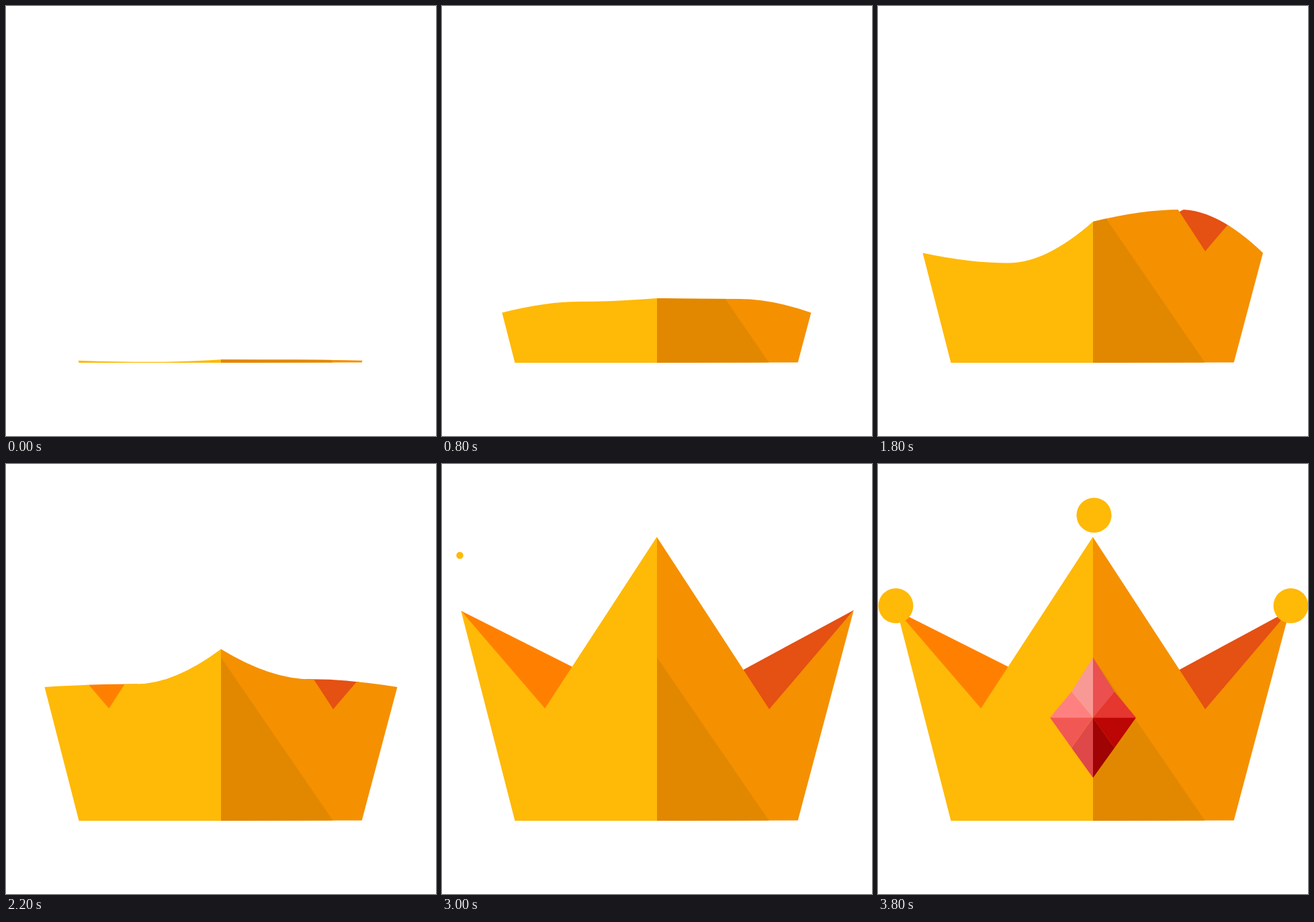
An HTML page for the animation above (4800 ms loop, 640 by 640 pixels).

```html
<!DOCTYPE html>
<html lang="en">
<head>
<meta charset="utf-8">
<title>Crown</title>
<style>
  html, body { margin: 0; width: 100%; height: 100%; overflow: hidden; background: #fff; }
  svg { display: block; width: 100%; height: 100%; }
</style>
</head>
<body>
<svg viewBox="0 0 640 640">
  <defs><clipPath id="fill"><path id="wave"/></clipPath></defs>
  <g clip-path="url(#fill)">
    <path fill="#ff8000" d="M28.3 218.5L193.3 301.5L200 372H153Z"/>
    <path fill="#e55013" d="M612.8 217.5L449 306L440 372H487Z"/>
    <path fill="#ffb907" d="M28.3 218.5L153.2 363.7L319.7 108.5L320 109V531H108.5Z"/>
    <path fill="#f59000" d="M320 109L487 365L612.8 217.5L529.7 530.5L320 531Z"/>
    <path fill="#e28800" d="M320 288L486.5 530.5L320 531Z"/>
  </g>
  <g id="gem"></g>
  <g id="dots" fill="#ffb907"></g>
</svg>
<script>
const STEP = 100, LAST = 38, LOOP = 4800;
const KEY_GAP = 6, SPEED_UP = 24, FULL = 30;
const GEM_END = 36, GEM_STEPS = 5;
const HANDLE = 0.45;

// Heights of the two swells, one every KEY_GAP steps
const leftSwell = [529.8, 480, 360, 382.5, 300, 300];
const rightSwell = [526.5, 440, 428, 303, 329, 306];

const dots = [
  { x: 26.5, y: 211, end: 34 },
  { x: 321.5, y: 76.2, end: 36 },
  { x: 614.5, y: 211, end: 38 }
];

const byId = id => document.getElementById(id);
const clamp = (v, lo, hi) => Math.min(hi, Math.max(lo, v));
const mix = (a, b, f) => a + (b - a) * f;
const leftEdge = y => 28.3 + (y - 218.5) * 0.2566;
const rightEdge = y => 612.8 - (y - 217.5) * 0.2655;

function add(parent, tag, attrs) {
  const el = document.createElementNS("http://www.w3.org/2000/svg", tag);
  for (const name in attrs) el.setAttribute(name, attrs[name]);
  byId(parent).append(el);
  return el;
}

// Inner and outer facet of each quarter: upper left, upper right, lower left, lower right
const facetColors = ["#f99995", "#ff8080", "#eb4f4f", "#e53630",
                     "#de4848", "#f25853", "#a00303", "#bc0505"];
let facet = 0;
for (const [tip, bend] of [[-89.5, -38.5], [89.5, 45]]) {
  for (const side of [-1, 1]) {
    for (const corner of [`0 ${tip}`, `${64 * side} 0`]) {
      add("gem", "path", { d: `M0 0L${corner}L${32 * side} ${bend}Z`, fill: facetColors[facet++] });
    }
  }
}
for (const dot of dots) dot.el = add("dots", "circle", { cx: dot.x });

const keyed = (track, n) => {
  const i = Math.floor(n / KEY_GAP);
  return mix(track[i], track[i + 1], n / KEY_GAP - i);
};
const rise = (from, rate, boost, n) => from - rate * n - boost * Math.max(0, n - SPEED_UP);

// A swell is level at its node; both handles lie at the node's height.
function swell(x0, x, y, x1, y1) {
  return `Q${mix(x, x0, HANDLE)} ${y} ${x} ${y}Q${mix(x, x1, HANDLE)} ${y} ${x1} ${y1}`;
}

function wavePath(n) {
  if (n >= FULL) return "M0 0H640V640H0Z";
  const edge = rise(527.7, 8.9, 10.4, n);
  const peak = rise(526.3, 11.4, 17.8, n);
  const x0 = leftEdge(edge), x1 = rightEdge(edge);
  return `M0 640V${edge}H${x0}` +
    swell(x0, 215 - 1.2 * Math.min(n, 18), keyed(leftSwell, n), 320, peak) +
    swell(320, 437 + 0.75 * n, keyed(rightSwell, n), x1, edge) +
    "H640V640Z";
}

function drawGem(n) {
  const left = clamp(GEM_END - n, 0, GEM_STEPS);
  byId("gem").setAttribute("opacity", 1 - left / GEM_STEPS);
  byId("gem").setAttribute("transform",
    `translate(320 ${377.6 - 2 * left}) scale(${1 + left / 6})`);
}

// Each dot grows while sinking slowly, then drops into place.
function drawDot({ el, y, end }, n) {
  const left = Math.max(0, end - n);
  const lift = 25.5 * Math.min(left, 2) + 12 * Math.max(left - 2, 0);
  el.setAttribute("cy", y - lift);
  el.setAttribute("r", 26 * clamp((4.5 - left) * 0.4, 0, 1));
}

function draw(ms) {
  const n = Math.min(LAST, Math.floor((ms % LOOP) / STEP));
  byId("wave").setAttribute("d", wavePath(n));
  drawGem(n);
  for (const dot of dots) drawDot(dot, n);
}

const start = performance.now();
function tick() {
  draw(performance.now() - start);
  requestAnimationFrame(tick);
}
tick();
</script>
</body>
</html>
```
